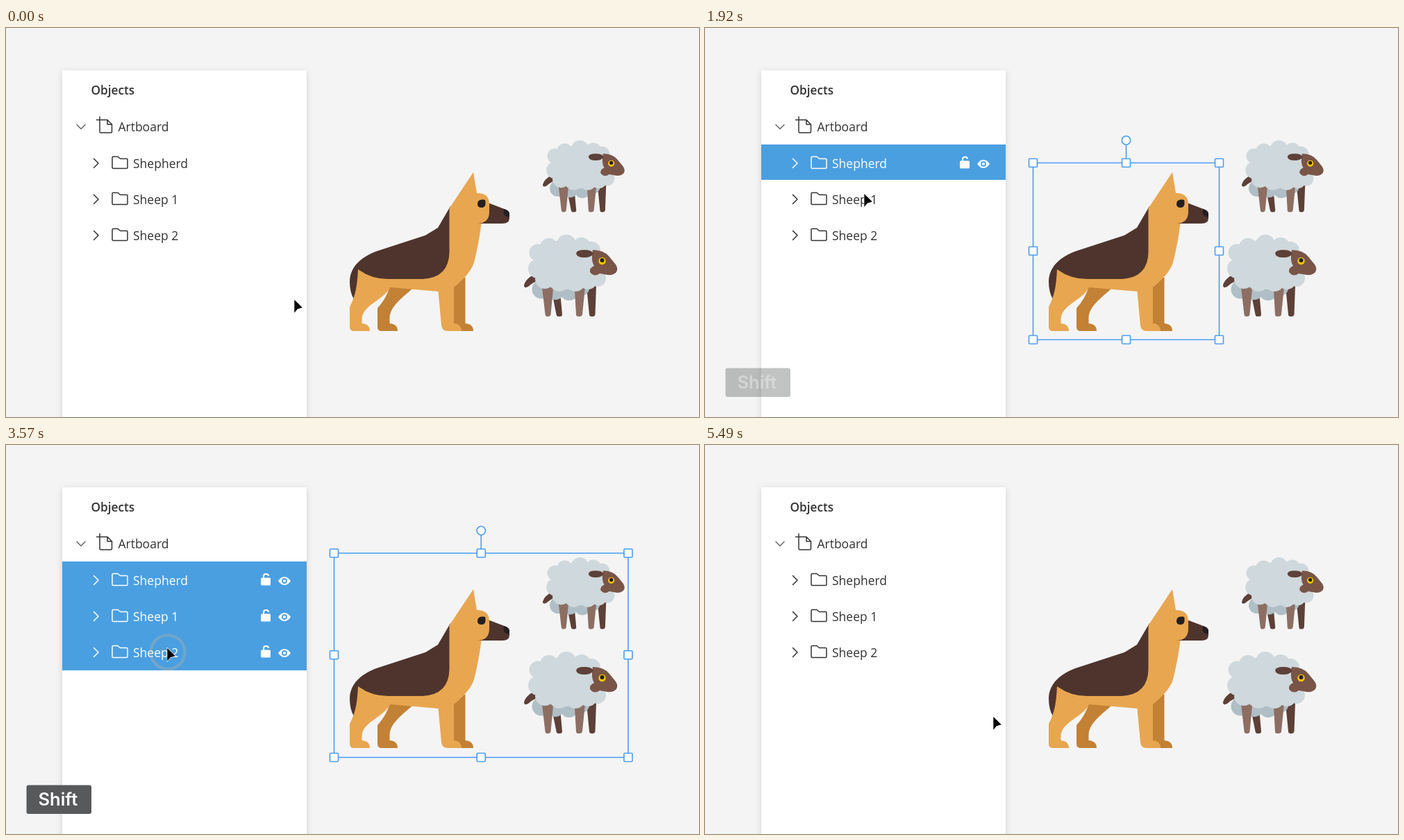
An HTML page that plays this animation: 998 px wide and 561 px high, repeating every 6.33 s.

```html
<!DOCTYPE html>
<html lang="en">
<head>
<meta charset="utf-8">
<title>Objects panel</title>
<style>
  html, body { margin: 0; width: 100%; height: 100%; overflow: hidden; background: #f4f4f4; }
  svg { display: block; width: 100%; height: 100%; }
  text { font-family: "Open Sans", "Noto Sans", sans-serif; font-size: 17.5px; fill: currentColor; }
  .panel { filter: drop-shadow(0 2px 5px rgba(0, 0, 0, .14)); }
  .line { fill: none; stroke: currentColor; stroke-width: 1.5; stroke-linejoin: round; stroke-linecap: round; }
  .frame { fill: none; stroke: #4a9cf6; stroke-width: 1.6; }
  .frame .grip { fill: #fff; }
</style>
</head>
<body>
<svg viewBox="0 0 998 561">
  <defs>
    <g id="sheep">
      <g fill="#5d4037">
        <path d="M746 371Q748 362 761 355L766 364Q757 368 752 373Q746 376 746 371Z"/>
        <path d="M786 380H798L801 413Q801 416 798 416H795Q793 416 792.500 413Z"/>
        <path d="M836 372H850L848.500 413Q848 416 845 416H843Q840 416 840 413Z"/>
      </g>
      <g id="underwool" fill="#b0bec5"></g>
      <g fill="#8d6e63">
        <path d="M772 374Q780 370 788 376L784.500 413Q784 416 781 416H779Q777 416 776.500 413Z"/>
        <path d="M819 379Q827 378 834 373L830 413Q829.500 416 826 416H824Q821 416 821 413Z"/>
      </g>
      <g id="wool" fill="#cfd8dc"><ellipse cx="808" cy="341" rx="46" ry="36"/></g>
      <path fill="#795548" d="M845 320Q861 320 869 330L878 341Q882 347 879 352Q875 357 866 356L855 354Q847 360 841 352Q840 346 847 343Q842 336 845 320Z"/>
      <path fill="#5d4037" d="M821 325Q822 320 833 320Q843 320 846 325Q843 331 833 331Q822 331 821 325Z"/>
      <circle cx="858.500" cy="336" r="5.200" fill="#fbc800"/>
      <circle cx="858.500" cy="335" r="3" fill="#231f20"/>
    </g>
  </defs>

  <rect width="998" height="561" fill="#f4f4f4"/>
  <rect class="panel" x="81" y="61" width="352" height="520" fill="#fff"/>

  <g color="#333">
    <text x="122.500" y="95.500" style="font-weight:600;font-size:17.2px">Objects</text>
    <text x="161.500" y="149">Artboard</text>
    <path class="line" color="#666" d="M102 139.500L108 145.500 114 139.500"/>
    <path class="line" d="M135 128V149.500Q135 151 136.500 151H151Q152.500 151 152.500 149.500V139L146 132.500H130.500M146 132.500V139H152.500"/>
  </g>
  <g id="rows"></g>

  <g id="dog">
    <g fill="#c28135">
      <path d="M553 372L585 376C575 386 553 400 552.500 418V426Q564 427 564 437H541Q535 437 535 431V404Q548 390 553 372Z"/>
      <path d="M640 360H661.500V426Q673 427 673 437H640Z"/>
    </g>
    <path fill="#4e342d" d="M694 252L719 261.500Q725 264 725 269V274Q725 282 715 282H672V260Z"/>
    <path fill="#231f20" d="M717 261L721 262.500Q725 264.500 725 268V272.500Q717 272 716.500 266Z"/>
    <path fill="#4e342d" d="M640 257L622 288 604 299 535 321.500C509 331 495 346 495 366Q495 381 501 391L515 366H640Z"/>
    <path fill="#e8a650" d="M673 208L678 238Q696 238 696 254V265Q696 282 678 282H684.500C682 302 679 318 674 338C671 349 660 362 645 374V426Q656 427 656 437H636Q628 437 627 429L622.500 380 553 374C545 392 513 399 512.500 420V426Q524 427 524 437H501Q495 437 495 431V402C505 384 506 365 507 348Q526 362 550 362H600Q638 360 638.500 323V260Z"/>
    <path fill="#231f20" d="M679 254Q679 247.500 685.500 247.500H688Q690.500 247.500 690.500 250V253Q690.500 259 684.700 259Q679 259 679 254Z"/>
  </g>
  <use href="#sheep"/>
  <use href="#sheep" transform="translate(773 162) scale(.877) translate(-746 -298)"/>

  <g id="frames"></g>

  <rect id="keyBox" x="29.500" y="490.500" width="93.500" height="41.500" rx="3" fill="#58595b"/>
  <text id="keyText" x="46.500" y="519.500" style="font:600 25.5px Inter,sans-serif;fill:#fff">Shift</text>

  <circle id="ring" fill="none" stroke="#edb87a" stroke-width="4"/>
  <path id="cursor" d="M.3 1V19.800L4.800 14.300 11.800 12.300Z" stroke="#fff" stroke-width="1.200" paint-order="stroke"/>
</svg>

<script>
const LOOP = 6330;
const $ = id => document.getElementById(id);

// Static parts built from short rules
const circles = list => list.map(([x, y, r]) => `<circle cx="${x}" cy="${y}" r="${r}"/>`).join('');
$('wool').innerHTML += circles([
  [766, 324, 12.5], [782, 316, 13], [807, 312, 14], [829, 315, 13], [843, 321, 13],
  [766, 347, 14], [776, 362, 14], [797, 366, 14], [820, 366, 14], [838, 364, 13], [852, 361, 12]
]);
$('underwool').innerHTML = circles([[771, 377, 13.5], [791, 379, 13], [811, 380, 13], [829, 375, 11]]);

const rowArt = (name, dy) => `<g transform="translate(0 ${dy})">
  <path class="line" d="M126.500 188.500L133 195 126.500 201.500"/>
  <path class="line" d="M153 187Q153 185.500 154.500 185.500H161L164.500 188.500H173.500Q175 188.500 175 190V201Q175 202.500 173.500 202.500H154.500Q153 202.500 153 201Z"/>
  <text x="183" y="202">${name}</text></g>`;

const badges = dy => `<g transform="translate(0 ${dy})" fill="#fff">
  <rect x="367" y="191.500" width="14" height="11" rx="1.500"/>
  <path d="M371 192V189Q371 186 374.500 186Q378 186 378 189" fill="none" stroke="#fff" stroke-width="2"/>
  <path d="M392 196Q396 190 401 190T410 196Q406 202 401 202T392 196Z"/>
  <circle cx="401" cy="196" r="3.900" fill="#4a9fe1"/><circle cx="401" cy="196" r="2.100"/></g>`;

const tops = [168, 219, 272, 325];
$('rows').innerHTML = ['Shepherd', 'Sheep 1', 'Sheep 2'].map((name, i) => `
  <g color="#333">${rowArt(name, i * 52)}</g>
  <g id="row${i}" color="#fff">
    <rect x="81" y="${tops[i]}" width="352" height="${tops[i + 1] - tops[i]}" fill="#4a9fe1"/>
    ${rowArt(name, i * 52)}${badges(i * 52)}
  </g>`).join('');

function frameArt([right, top, bottom], i) {
  const left = 472.5, cx = (left + right) / 2, cy = (top + bottom) / 2 - .5;
  const grips = [[left, top], [cx, top], [right, top], [left, cy], [right, cy],
    [left, bottom], [cx, bottom], [right, bottom]];
  return `<g id="frame${i}" class="frame">
    <path d="M${left} ${top}H${right}V${bottom}H${left}ZM${cx} ${top}V${top - 27}"/>
    <circle class="grip" cx="${cx}" cy="${top - 32.5}" r="6.200"/>
    ${grips.map(([x, y]) => `<rect class="grip" x="${x - 6}" y="${y - 6}" width="12" height="12" rx="1"/>`).join('')}</g>`;
}
$('frames').innerHTML = [[740.5, 194.5, 449.5], [896, 194.5, 449.5], [896, 156, 450.5]].map(frameArt).join('');

// Motion
const clicks = [
  { at: 1000, x: 256, y: 190 },
  { at: 2100, x: 227.5, y: 241 },
  { at: 3060, x: 232, y: 292 }
];
const rest = { x: 415, y: 391 };
const moves = [
  [30, 900, clicks[0]], [1350, 2100, clicks[1]], [2500, 3050, clicks[2]], [4880, 5490, rest]
];

const ramp = (t, a, b) => Math.min(1, Math.max(0, (t - a) / (b - a)));
const easeInOut = u => u < .5 ? 4 * u ** 3 : 1 - 4 * (1 - u) ** 3;
const fade = (id, value) => $(id).setAttribute('opacity', value);

function cursorAt(t) {
  let { x, y } = rest;
  for (const [start, end, to] of moves) {
    const u = easeInOut(ramp(t, start, end));
    x += (to.x - x) * u;
    y += (to.y - y) * u;
  }
  return [x, y];
}

function drawRing(t) {
  const click = clicks.find(c => t >= c.at && t < c.at + 600);
  fade('ring', 0);
  if (!click) return;
  const u = (t - click.at) / 600;
  $('ring').setAttribute('cx', click.x + 1);
  $('ring').setAttribute('cy', click.y + 6.7);
  $('ring').setAttribute('r', 24.5 * (1 - (1 - u) ** 5));
  fade('ring', Math.min(1, (1 - u) / .6));
}

function draw(t) {
  const clear = 1 - ramp(t, 5000, 5300);
  const frameIn = [ramp(t, 940, 1090), ramp(t, 2100, 2220), ramp(t, 3060, 3180), 0];
  clicks.forEach((click, i) => {
    fade('row' + i, ramp(t, click.at, click.at + 120) * clear);
    fade('frame' + i, frameIn[i] * (1 - frameIn[i + 1]) * clear);
  });
  const key = ramp(t, 1810, 2110) * (1 - ramp(t, 3750, 4060));
  fade('keyBox', key);
  fade('keyText', key);
  drawRing(t);
  $('cursor').setAttribute('transform', `translate(${cursorAt(t)})`);
}

const begin = performance.now();
function tick() {
  draw((performance.now() - begin) % LOOP);
  requestAnimationFrame(tick);
}
tick();
</script>
</body>
</html>
```
